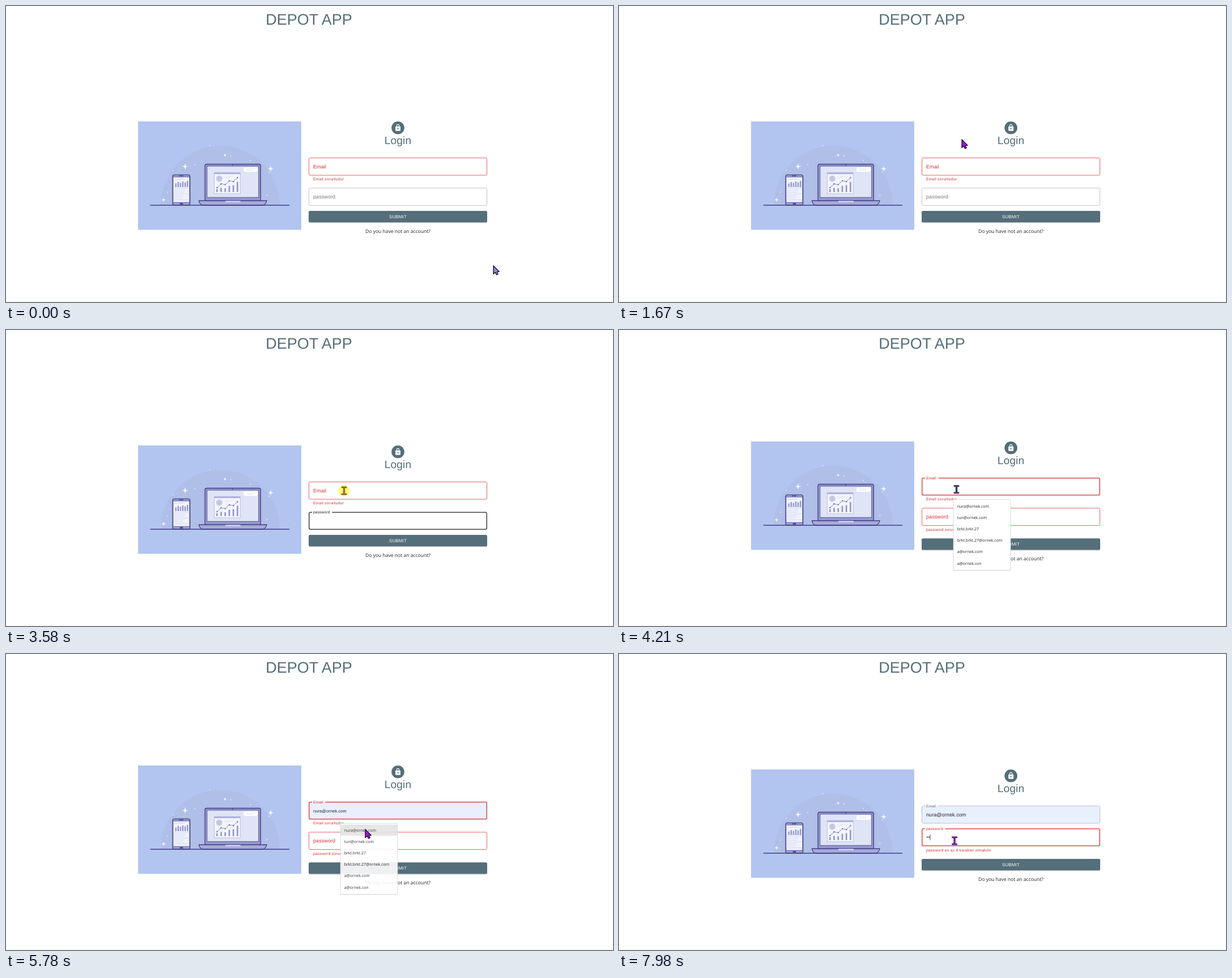
An HTML page that plays this animation: 1071 by 523 pixels, repeating every 8 s.

```html
<!DOCTYPE html>
<html lang="en">
<head>
<meta charset="utf-8">
<title>Login</title>
<style>
html, body { margin: 0; height: 100%; overflow: hidden; background: #fff; }
svg { display: block; width: 100%; height: 100%; }
text { font-family: "Liberation Sans", Arial, sans-serif; text-rendering: geometricPrecision; }
.ui { font-family: "Open Sans", "Noto Sans", sans-serif; }
.helper { font-size: 6.75px; letter-spacing: .033em; fill: #d32f2f; }
</style>
</head>
<body>
<svg viewBox="0 0 1071 523">
  <text x="534.5" y="33" font-size="27" fill="#546e7a" text-anchor="middle">DEPOT APP</text>
  <path d="M0 522.5H1071" stroke="#f1f1f1"/>
  <g id="top">
    <g id="art"></g>
    <circle cx="691.5" cy="215.2" r="11.3" fill="#546e7a"/>
    <g transform="translate(684.8 208.3) scale(.5625)">
      <path fill="#fff" d="M18 8h-1V6c0-2.76-2.24-5-5-5S7 3.24 7 6v2H6c-1.1 0-2 .9-2 2v10c0 1.1.9 2 2 2h12c1.1 0 2-.9 2-2V10c0-1.1-.9-2-2-2zm-6 9c-1.1 0-2-.9-2-2s.9-2 2-2 2 .9 2 2-.9 2-2 2zm3.1-9H8.9V6c0-1.71 1.39-3.1 3.1-3.1s3.1 1.39 3.1 3.1v2z"/>
    </g>
    <text x="691.5" y="244.2" font-size="19.1" letter-spacing=".14" fill="#546e7a" text-anchor="middle">Login</text>
  </g>
  <g id="form"></g>
</svg>
<script>
const $ = id => document.getElementById(id);
const RED = '#d32f2f', INK = '#222', NAVY = '#3f3f87', LILAC = '#9598cc';
const LOOP = 8000, HELPER = 13.2, ROW = 20.2;
const EMAIL = 'nura@ornek.com';
const SAVED = [EMAIL, 'tun@ornek.com', 'brkt.brkt.27', 'brkt.brkt.27@ornek.com', 'a@ornek.com', 'a@ornek.con'];

// Moments at which the page changes
const PASS_FOCUS = 2680, EMAIL_FOCUS = 3690, LIST_OPEN = 3780, HOVER = 5300,
      PICKED = 5870, PASS_AGAIN = 6530, KEY1 = 7720, KEY2 = 7980;

// The pointer circles twice, then makes these moves: from, to, x, y
const SPIN_START = 230, SPIN_END = 1670;
const MOVES = [
  [1670, 1850, 594, 288], [2000, 2300, 595, 345], [2840, 3380, 596.5, 284],
  [4140, 4280, 593, 276], [4910, 5450, 634, 310], [5810, 6260, 592, 330]
];

const within = (t, ...spans) => spans.some(([a, b]) => t >= a && t < b);
const progress = (t, a, b) => Math.min(1, Math.max(0, (t - a) / (b - a)));
const smooth = p => p * p * (3 - 2 * p);
const ramp = (t, start) => smooth(progress(t, start, start + 200));
const repeat = (n, draw) => Array.from({ length: n }, (_, i) => draw(i)).join('');

const rect = (x, y, w, h, fill, more = '') =>
  `<rect x="${x}" y="${y}" width="${w}" height="${h}" fill="${fill}" ${more}/>`;
const circle = (x, y, r, fill) => `<circle cx="${x}" cy="${y}" r="${r}" fill="${fill}"/>`;
const line = (d, stroke, width = 1) =>
  `<path d="${d}" fill="none" stroke="${stroke}" stroke-width="${width}"/>`;
const text = (x, y, size, fill, str, more = '') =>
  `<text x="${x}" y="${y}" font-size="${size}" fill="${fill}" ${more}>${str}</text>`;

function drawArt() {
  const edge = `stroke="${NAVY}" stroke-width="1.3"`;
  const star = (x, y, r) =>
    `<path transform="translate(${x} ${y}) scale(${r})" d="M0-1Q0 0 1 0Q0 0 0 1Q0 0-1 0Q0 0 0-1" fill="#fff" stroke="#fff" stroke-width=".15"/>`;
  const dots = repeat(8, i => {
    const a = (194 + 22 * i) * Math.PI / 180, r = 96 + 12 * Math.sin(2.5 * i);
    return circle(378 + r * Math.cos(a), 352 + r * Math.sin(a), .9, '#eef2fd');
  });
  const trendX = i => 372.4 + 7.2 * i, trendY = i => 321 - 2.7 * i - i % 2 * 4;
  const chart =
    rect(367.5, 294.3, 45.8, 37.5, '#f3f5fd', 'stroke="#b3b4da" stroke-width=".8"') +
    rect(367.5, 294, 45.8, 3, '#aeb0da') +
    circle(376.3, 305, 5.5, '#c6cbe6') +
    line('M372.5 305H380M376.3 301V309', '#b1b6da', .6) +
    line('M386 301H400M386 304H394', '#dfe3f4') +
    repeat(6, i => {
      const h = 5 + .45 * i * i + i % 2 * 2;
      return rect(trendX(i) - 1.4, 328.8 - h, 2.7, h, LILAC);
    }) +
    line('M' + Array.from({ length: 6 }, (_, i) => `${trendX(i)} ${trendY(i)}`).join('L'), '#7d80bb', .9) +
    repeat(6, i => circle(trendX(i), trendY(i), 1.2, '#6c6fb0'));
  const laptop =
    rect(351, 279.5, 98.3, 65, LILAC, `rx="3" ${edge}`) +
    rect(354.8, 283, 91, 55.2, '#dfe4f6', `stroke="${NAVY}" stroke-width=".8"`) +
    circle(400, 281.2, .9, NAVY) +
    `<path d="M340.5 344H460q-1 6-7 8H347q-6-2-6.5-8z" fill="#a9a9d8" ${edge}/>` +
    rect(387, 344.3, 27, 2.4, '#d3d7f4', 'rx="1"') +
    rect(419, 285.3, 25, 7.6, '#fff', 'rx="3"') +
    line('M424 287.8H441M424 290.4H436', '#d9dff3', .8) + chart;
  const phone =
    rect(294, 298.3, 30.6, 53.5, '#a3a3d4', `rx="3" ${edge}`) +
    rect(295.6, 302.2, 27.4, 44.8, '#f0f3fc') +
    rect(305, 299.4, 8, 1.4, NAVY, 'rx=".7"') +
    rect(306.5, 348.2, 6, 2.4, NAVY, 'rx="1"') +
    line('M295 302H324M295 347.2H324', NAVY, .8) +
    line('M298 306H315', '#cfd4ee') +
    repeat(6, i => {
      const h = 6.5 + .5 * i + i % 2 * 2;
      return rect(298.5 + 4.1 * i, 320 - h, 2.4, h, LILAC);
    }) +
    repeat(7, i => line(`M297 ${322 + 3.4 * i}h${i % 3 ? 20 - i : 25}`, '#cdd3ee', .9));
  $('art').innerHTML =
    rect(233, 204, 288, 191.5, '#b2c5f0') +
    '<path d="M273 352a105 105 0 0 1 210 0z" fill="#afbfe8"/>' +
    star(316, 283.5, 4.5) + star(467, 287.5, 4) + star(278, 342.5, 3.2) + star(386.5, 263.5, 2.4) +
    dots + laptop + phone + line('M254.5 352H500', NAVY, 1.3);
}

// Outlined input; shrink moves the label from the field into the border
function field(y, f) {
  const color = f.error ? RED : f.focus ? INK : '#777';
  const border = f.focus ? color : f.error ? '#e06565' : f.fill ? '#b9bfd6' : '#c4c4c4';
  const gap = f.shrink > 0 ? f.gap : 540;
  const inset = f.focus ? .3 : 0, top = y + inset, left = 534.5 + inset, right = 848.5 - inset;
  const side = 26.6 - 2 * inset;
  let s = f.fill ? rect(535, y, 313.5, 30.6, f.fill, 'rx="2"') : '';
  s += line(`M${gap} ${top}H${right - 2}q2 0 2 2v${side}q0 2-2 2H${left + 2}q-2 0-2-2v${-side}q0-2 2-2H540`,
    border, f.focus ? 1.3 : 1);
  s += text(542, y + 18.1 - 16 * f.shrink, 9 - 2.25 * f.shrink, color, f.label, 'letter-spacing=".08"');
  if (f.error) s += `<text class="helper" x="542" y="${y + 40}">${f.error}</text>`;
  if (f.caret) s += rect(f.caret, y + 10.3, .8, 10.2, INK);
  return s + f.content;
}

function savedList(t) {
  return `<g opacity="${t >= 5670 ? .9 : 1}">` +
    rect(589.5, 300, 102, 126, '#000', 'opacity=".07" rx="2"') +
    rect(590, 299.5, 101, 125, '#fff', 'stroke="#d0d0d0" stroke-width=".7" rx="1"') +
    (t >= HOVER ? rect(590, 301.5, 101, 19.7, '#e4e4e4') : '') +
    SAVED.map((s, i) => text(596.7, 313.5 + i * ROW, 7, INK, s, 'class="ui"')).join('') + '</g>';
}

function pointerAt(t) {
  if (t < 90) return [860, 459];
  if (t < SPIN_START) return [628, 333];
  t = 50 + 90 * Math.floor((t - 50) / 90);
  const angle = 2.17 + 4 * Math.PI * progress(t, SPIN_START, SPIN_END);
  const [cx, cy, rx, ry] = t < 1085 ? [690, 225, 114, 97] : [676, 150, 126, 104];
  let x = cx + rx * Math.cos(angle), y = cy + ry * Math.sin(angle);
  for (const [from, to, toX, toY] of MOVES) {
    const p = smooth(progress(t, from, to));
    x += (toX - x) * p;
    y += (toY - y) * p;
  }
  return [x, y];
}

function pointer(t, x, y, beam) {
  const click = within(t, [2590, 2770], [3490, 3690], [5670, 5760], [6440, 6620]);
  const beamFill = click ? '#8a6250' : t < PICKED ? '#4a2a78' : '#8a18aa';
  const shape = beam
    ? `<path d="M-4.5-7.2h9v2.2h-3.2v10h3.2v2.2h-9v-2.2h3.2v-10h-3.2z" fill="${beamFill}" stroke="${click ? beamFill : '#1d1430'}" stroke-width=".6"/>`
    : `<path d="M0 0V14.5L3.3 11.6L5.5 16L8.2 14.8L6.2 10.8L10.2 10.3Z" fill="${t < 90 ? '#9d7cec' : '#b208ee'}" stroke="#15101f" stroke-width="1.3" stroke-linejoin="round"/>`;
  return `<g transform="translate(${x} ${y})">${click ? circle(0, 0, 10, '#fdfb6a') : ''}${shape}</g>`;
}

function draw(t) {
  const passError = t >= EMAIL_FOCUS, emailError = t < PICKED;
  const shift = passError && emailError ? -7 : 0;
  const emailY = 268.4 + shift;
  const passY = emailY + 40.2 + (emailError ? HELPER : 0);
  const buttonY = passY + 40.2 + (passError ? HELPER : 0);
  const listOpen = within(t, [LIST_OPEN, PICKED]);
  const preview = t < PICKED;
  const dots = (t >= KEY1) + (t >= KEY2);

  const email = field(emailY, {
    label: 'Email', gap: 563.5,
    shrink: ramp(t, EMAIL_FOCUS),
    focus: within(t, [EMAIL_FOCUS, PASS_AGAIN]),
    error: emailError && 'Email zorunludur',
    fill: t >= HOVER && '#e8f0fe',
    caret: within(t, [EMAIL_FOCUS, 4210], [4680, HOVER]) ? 542.2 : within(t, [PICKED, PASS_AGAIN]) && 612,
    content: t < HOVER ? '' : text(542, emailY + 18.2, preview ? 7.5 : 9, INK, EMAIL, 'letter-spacing=".09"')
  });
  const pass = field(passY, {
    label: 'password', gap: 575.5,
    shrink: ramp(t, PASS_FOCUS) - ramp(t, EMAIL_FOCUS) + ramp(t, PASS_AGAIN),
    focus: within(t, [PASS_FOCUS, EMAIL_FOCUS], [PASS_AGAIN, LOOP]),
    error: passError && (dots ? 'password en az 8 karakter olmalıdır' : 'password zorunludur'),
    caret: within(t, [PASS_FOCUS, 3130], [PASS_AGAIN, 7080], [7530, LOOP]) && 542.2 + 3.2 * dots,
    content: repeat(dots, i => circle(543.8 + i * 3.2, passY + 15, 1.1, INK))
  });
  const button =
    rect(534, buttonY + 1, 315, 20.3, '#000', 'rx="2.5" opacity=".28"') +
    rect(534, buttonY, 315, 20, '#546e7a', 'rx="2.3"') +
    text(691.5, buttonY + 12.8, 7.9, '#fff', 'SUBMIT', 'letter-spacing=".22" text-anchor="middle"');
  const link = text(691.5, buttonY + 39.2, 8.56, INK, 'Do you have not an account?', 'class="ui" text-anchor="middle"');

  const [x, y] = pointerAt(t);
  const beam = x > 534 && x < 849 && !(listOpen && y > 300) &&
    [emailY, passY].some(top => y > top && y < top + 31);

  $('top').setAttribute('transform', `translate(0 ${shift})`);
  $('form').innerHTML = email + pass + button + link + (listOpen ? savedList(t) : '') + pointer(t, x, y, beam);
}

function tick() {
  draw(performance.now() % LOOP);
  requestAnimationFrame(tick);
}
drawArt();
tick();
</script>
</body>
</html>
```
